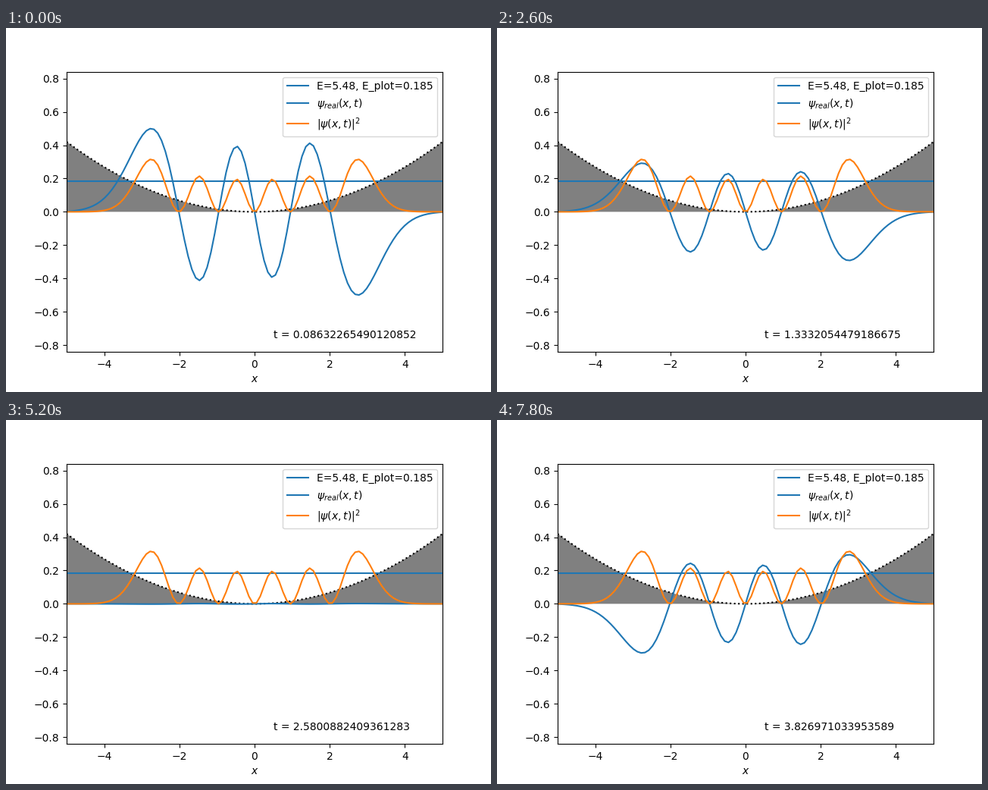
These frames come from a looping animation (640x480 px, 8000 ms). A matplotlib script:

```python
import numpy as np
import matplotlib.pyplot as plt
from matplotlib.animation import FuncAnimation

LEVEL = 5            # excited state of the harmonic oscillator
POINTS = 100
FRAMES = 40
STEPS = 10           # time steps per frame

# Eigenstate of the discretised Hamiltonian (hbar = m = 1)
x = np.linspace(-5, 5, POINTS)
dx = 10 / (POINTS - 1)
V = 0.5 * x**2
off = np.full(POINTS - 1, -0.5 / dx**2)
H = np.diag(V + 1 / dx**2) + np.diag(off, 1) + np.diag(off, -1)
energies, states = np.linalg.eigh(H)
E = energies[LEVEL]
psi = states[:, LEVEL] / np.sqrt(dx)
if psi[np.argmax(x > -2.8)] < 0:
    psi = -psi

# Largest stable step is 1 / (1/dx^2 + Vmax/2) = 1 / 104.26
dt = 1 / 104.26
times = np.cumsum(np.full(FRAMES * STEPS, dt))[STEPS - 2::STEPS]

ymax = 1.5 * psi.max()
scale = ymax / 2 / V.max()
V_plot = V * scale
E_plot = E * scale

fig, ax = plt.subplots(figsize=(6.4, 4.8), dpi=100)
ax.fill_between(x, V_plot, facecolor="0.5", zorder=0)
ax.plot(x, V_plot, ":k", zorder=0)
ax.axhline(E_plot, color="C0", label=f"E={E:.2f}, E_plot={E_plot:.3f}")
wave, = ax.plot(x, psi, color="C0", label=r"$\psi_{real}(x,t)$")
ax.plot(x, psi**2, color="C1", label=r"$|\psi(x,t)|^2$")
clock = ax.text(0.5, -0.9 * ymax, "")
ax.set_xlim(-5, 5)
ax.set_ylim(-ymax, ymax)
ax.set_xlabel("$x$")
ax.legend(loc="upper right")


def update(i):
    t = float(times[i])
    wave.set_ydata(psi * np.cos(E * t))
    clock.set_text(f"t = {t}")
    return wave, clock


anim = FuncAnimation(fig, update, frames=FRAMES, interval=200,
                     repeat=True, repeat_delay=0)
plt.show()
```
